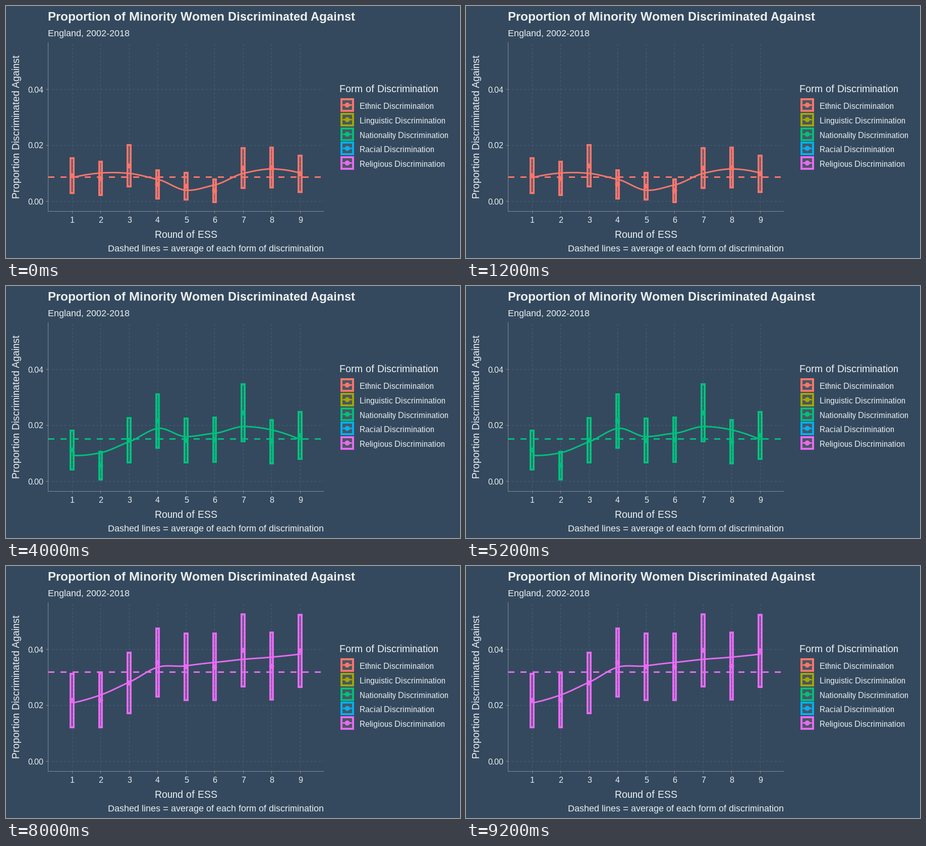
Animation of 900 by 500 pixels, one loop 10 s. Source, as a matplotlib script:

```python
import numpy as np
import matplotlib.pyplot as plt
from matplotlib.animation import ArtistAnimation
from matplotlib.patches import Circle, Rectangle

# Grid-fitted glyphs with whole-pixel advances
plt.rcParams.update({"text.hinting": "native", "text.hinting_factor": 1,
                     "font.family": "Liberation Sans"})

W, H, DPI = 900, 500, 100
PX = 72 / DPI  # points per pixel
BG, TEXT, GRID, AXIS = "#34495e", "#ecf0f1", "#46607a", "#7f8c9a"
LEFT, RIGHT, TOP, BOTTOM = 83.5, 630, 72, 407.5
DASH = (0, (4, 4))

# Share discriminated against in each round, per thousand
SERIES = {
    "Ethnic": ("#f8766d", [9.1, 8.1, 12.6, 6, 5.3, 3.7, 11.8, 12, 9.8]),
    "Linguistic": ("#a3a500", [2.8, 2.3, 3.5, 1.8, 2.9, 0.5, 9.8, 3.4, 3.2]),
    "Nationality": ("#00bf7d",
                    [11.1, 5.5, 14.6, 21.5, 14.5, 14.8, 24.4, 14, 16.3]),
    "Racial": ("#00b0f6",
               [24.3, 18.8, 21.5, 26.5, 18.5, 19.6, 40.6, 26.9, 30.7]),
    "Religious": ("#e76bf3",
                  [21.7, 21.8, 28, 35.3, 33.8, 33.7, 39.7, 34, 39.5]),
}
ROUNDS = np.arange(1, 10)
SAMPLE = 880  # respondents per round


def to_x(r):
    return 131 + 56.5 * (r - 1)


def to_y(p):
    return 387 - 5537 * p


def local_fit(y, x0, q=6):
    """Value and slope at x0 of a tricube weighted local quadratic."""
    d = ROUNDS - x0
    h = np.sort(abs(d))[q - 1]
    w = np.clip(1 - (abs(d) / h) ** 3, 0, None) ** 1.5
    A = np.vander(d, 3, increasing=True)
    return np.linalg.lstsq(A * w[:, None], y * w, rcond=None)[0][:2]


def smooth(y, n=80):
    """Loess curve: local fits at each round joined by cubic Hermites."""
    fits = np.array([local_fit(y, r) for r in ROUNDS])
    x = np.linspace(1, 9, n)
    i = np.minimum(x.astype(int) - 1, 7)
    t = x - ROUNDS[i]
    (f0, d0), (f1, d1) = fits[i].T, fits[i + 1].T
    s = t * t * (3 - 2 * t)
    return x, (f0 * (1 - s) + f1 * s
               + d0 * t * (1 - t) ** 2 - d1 * t * t * (1 - t))


fig = plt.figure(figsize=(W / DPI, H / DPI), dpi=DPI, facecolor=BG)
ax = fig.add_axes([0, 0, 1, 1])
ax.set_xlim(0, W)
ax.set_ylim(H, 0)
ax.axis("off")


def label(x, y, s, size, **kw):
    ax.text(x, y, s, fontsize=size * PX, color=TEXT, va="baseline", **kw)


def line(x, y, color, width, z=3, **kw):
    return ax.plot(x, y, color=color, lw=width * PX, zorder=z, snap=False,
                   solid_capstyle="butt", dash_capstyle="butt", **kw)[0]


def box(x0, y0, x1, y1, color, fill="none"):
    return ax.add_patch(Rectangle((x0, y0), x1 - x0, y1 - y0, ec=color,
                                  fc=fill, lw=4 * PX, joinstyle="miter",
                                  snap=False, zorder=4))


def dot(x, y, color):
    return ax.add_patch(Circle((x, y), 5, fc=color, ec="none", zorder=5))


def draw_axes():
    for r in ROUNDS:
        x = np.floor(to_x(r)) + 0.5
        line([x, x], [BOTTOM, TOP], GRID, 1, z=1, ls=DASH)
        line([x, x], [BOTTOM, BOTTOM + 4], AXIS, 1, z=2)
        label(x, 430, str(r), 16, ha="center")
    for p in (0, 0.02, 0.04):
        y = np.floor(to_y(p)) + 0.5
        line([LEFT, RIGHT], [y, y], GRID, 1, z=1, ls=DASH)
        line([LEFT - 4, LEFT], [y, y], AXIS, 1, z=2)
        label(74, y + 6, f"{p:.2f}", 16, ha="right")
    line([LEFT, LEFT, RIGHT], [TOP, BOTTOM, BOTTOM], AXIS, 1, z=2)


def draw_titles():
    label(83, 29, "Proportion of Minority Women Discriminated Against", 24,
          weight="bold")
    label(83, 60, "England, 2002-2018", 18)
    label(357, 460, "Round of ESS", 20, ha="center")
    label(27, 239, "Proportion Discriminated Against", 20, ha="center",
          rotation=90, rotation_mode="anchor")
    label(RIGHT, 487, "Dashed lines = average of each form of discrimination",
          18, ha="right")


def draw_legend():
    x, half = 676.5, 11.5
    label(661, 171, "Form of Discrimination", 20)
    for i, (name, (color, _)) in enumerate(SERIES.items()):
        y = 196.5 + round(28.8 * i)
        box(x - half, y - half, x + half, y + half, color, "#4b5661")
        line([x - 9, x + 9], [y, y], color, 3, z=5)
        dot(x, y, color)
        label(701, y + 7.5, f"{name} Discrimination", 16)


def draw_series(color, rates):
    p = np.array(rates) / 1000
    margin = 1.96 * np.sqrt(p * (1 - p) / SAMPLE)
    mean = np.round(to_y(p.mean())) + 0.5
    x, y = smooth(p)
    arts = [line([84, RIGHT], [mean, mean], color, 3, ls=DASH),
            line(to_x(x) + 0.5, to_y(y) + 0.5, color, 3, z=6)]
    for r, mid, m in zip(ROUNDS, p, margin):
        x0, x1 = np.round(to_x(r + np.array([-0.05, 0.05])))
        y0, y1 = np.round(to_y(mid + np.array([m, -m])))
        arts += [box(x0, y0, x1, y1, color),
                 dot(to_x(r), to_y(mid), color)]
    return arts


draw_axes()
draw_titles()
draw_legend()
frames = [draw_series(*s) for s in SERIES.values()]
anim = ArtistAnimation(fig, frames, interval=2000, repeat=True, repeat_delay=0)
plt.show()
```
